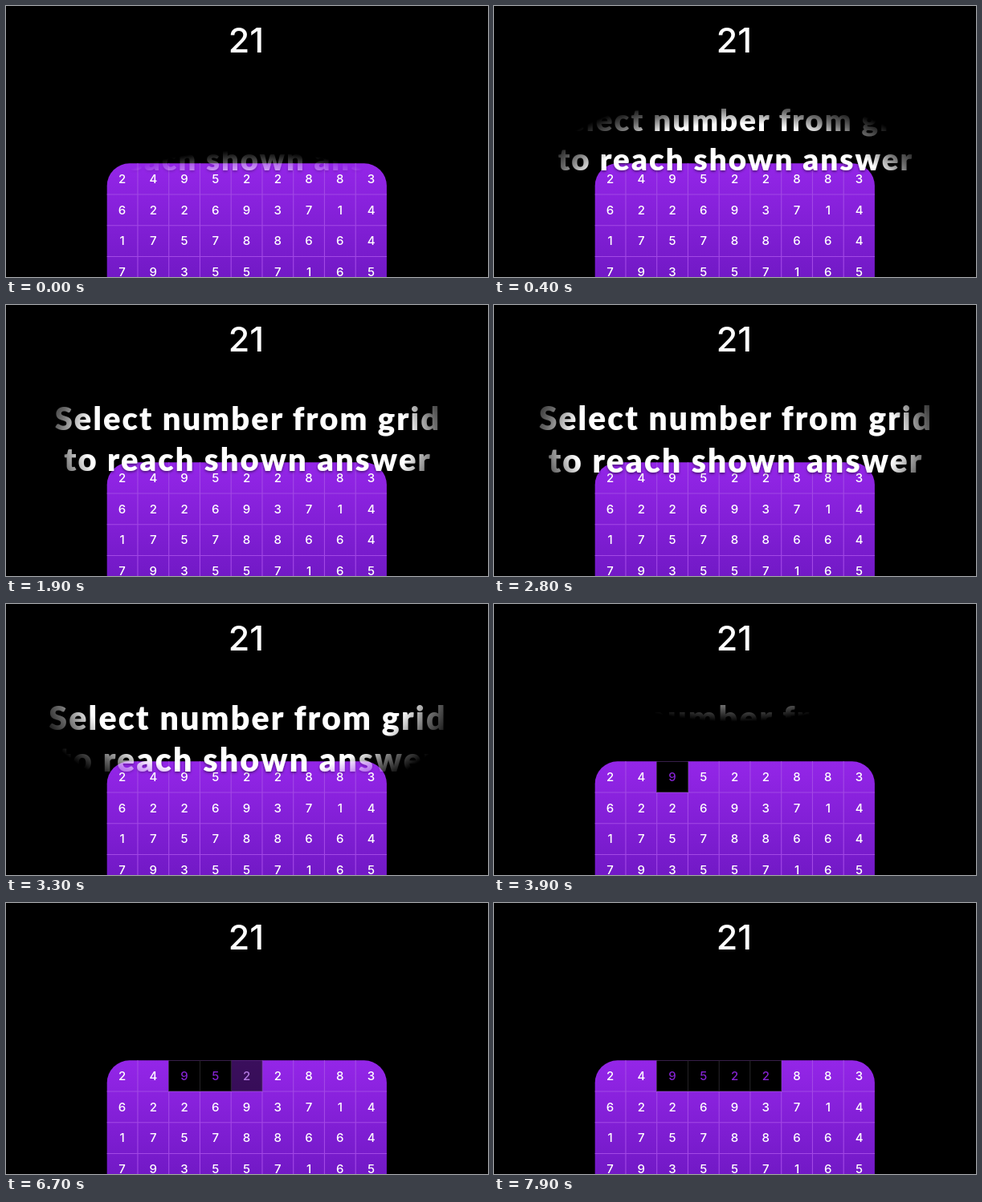
An HTML page for the animation above (8 s loop, 600 by 338 pixels).

```html
<!DOCTYPE html>
<html lang="en">
<head>
<meta charset="utf-8">
<title>Number grid</title>
<style>
  html, body { margin: 0; width: 100%; height: 100%; overflow: hidden; background: #000; }
  svg { display: block; width: 100vw; height: 100vh; }
  text { text-anchor: middle; fill: #fff; }
  .answer, .digit { font-family: Inter, Roboto, sans-serif; font-weight: 500; }
  .answer { font-size: 43px; }
  .digit { font-size: 15px; }
  .title { font: 900 39px Lato, "Open Sans", sans-serif; letter-spacing: 2.05px; }
</style>
</head>
<body>
<svg viewBox="0 0 600 338">
  <defs>
    <linearGradient id="purple" gradientUnits="userSpaceOnUse" x1="0" y1="196" x2="0" y2="338">
      <stop offset="0" stop-color="#9426e8"/>
      <stop offset="1" stop-color="#7219c6"/>
    </linearGradient>
    <radialGradient id="glow" gradientUnits="userSpaceOnUse" cx="0" cy="0" r="1">
      <stop offset=".74" stop-color="#fff"/>
      <stop offset=".87" stop-color="#fff" stop-opacity=".42"/>
      <stop offset="1" stop-color="#fff" stop-opacity="0"/>
    </radialGradient>
    <mask id="reveal" maskUnits="userSpaceOnUse" x="0" y="0" width="600" height="338"
      color-interpolation="sRGB">
      <rect width="600" height="338" fill="url(#glow)"/>
    </mask>
    <filter id="shadow" filterUnits="userSpaceOnUse" x="0" y="90" width="600" height="150">
      <feDropShadow dx="0" dy="1.5" stdDeviation="1.5" flood-color="#000" flood-opacity=".5"/>
    </filter>
    <clipPath id="panel"><rect x="125.7" y="196.3" width="348.2" height="200" rx="28"/></clipPath>
  </defs>
  <rect width="600" height="338"/>
  <text class="answer" x="299" y="58">21</text>
  <g id="grid" clip-path="url(#panel)">
    <rect x="125" y="196" width="349" height="142" fill="url(#purple)"/>
  </g>
  <g mask="url(#reveal)">
    <g id="title" class="title" filter="url(#shadow)">
      <text x="301" y="156">Select number from grid</text>
      <text x="301" y="206">to reach shown answer</text>
    </g>
  </g>
</svg>
<script>
  const LOOP = 8000, PITCH = 38.75, LEFT = 125.2, TOP = 196.2, FADE = 250;
  const ROWS = ["249522883", "622693714", "175788664", "793557165"];
  // Column in the first row and the moment it is picked
  const PICKS = [[2, 3550], [3, 4550], [4, 6550], [5, 7650]];

  const byId = id => document.getElementById(id);
  const grid = byId("grid"), title = byId("title"), glow = byId("glow");
  const clamp = v => Math.min(1, Math.max(0, v));
  const mix = (a, b, k) => a.map((v, i) => Math.round(v + (b[i] - v) * k));

  function add(tag, attrs, content = "") {
    const el = document.createElementNS("http://www.w3.org/2000/svg", tag);
    for (const key in attrs) el.setAttribute(key, attrs[key]);
    el.textContent = content;
    return grid.appendChild(el);
  }

  const colX = c => LEFT + c * PITCH, rowY = r => TOP + r * PITCH;
  const digit = (c, r) => add("text", {
    class: "digit", x: colX(c + .5), y: rowY(r + .5) + 5.2
  }, ROWS[r][c]);

  let lines = "";
  for (let c = 1; c < 9; c++) lines += `M${colX(c)} 196V338`;
  for (let r = 1; r < 4; r++) lines += `M125 ${rowY(r)}H474`;
  add("path", { d: lines, stroke: "#a248e5", "stroke-width": 1.1 });

  const cells = PICKS.map(([c, start]) => ({
    c, start,
    box: add("rect", {
      x: colX(c), y: TOP + .3, width: PITCH, height: PITCH - .6,
      fill: "#000", stroke: "#2a2a2a", "stroke-width": .7
    })
  }));
  ROWS.forEach((row, r) => [...row].forEach((_, c) => {
    const el = digit(c, r);
    const cell = r === 0 && cells.find(item => item.c === c);
    if (cell) cell.label = el;
  }));

  function draw(t) {
    const scale = 1 + .0224 * (t - 900) / 1000;
    title.setAttribute("transform", `translate(300 146) scale(${scale}) translate(-300 -146)`);

    // The soft spotlight rises into place, rests, then leaves upward
    const rise = .18 * Math.max(0, 900 - t);
    const leave = .18 * Math.max(0, t - 2950);
    glow.setAttribute("gradientTransform", `translate(300 ${168 + rise - leave}) scale(272 150)`);
    title.style.display = t > 4300 ? "none" : "";

    for (const { start, box, label } of cells) {
      const k = clamp((t - start) / FADE);
      box.setAttribute("opacity", k);
      label.style.fill = `rgb(${mix([255, 255, 255], [132, 34, 208], k)})`;
    }
  }

  const begin = performance.now();
  function tick() {
    draw((performance.now() - begin) % LOOP);
    requestAnimationFrame(tick);
  }
  tick();
</script>
</body>
</html>
```
